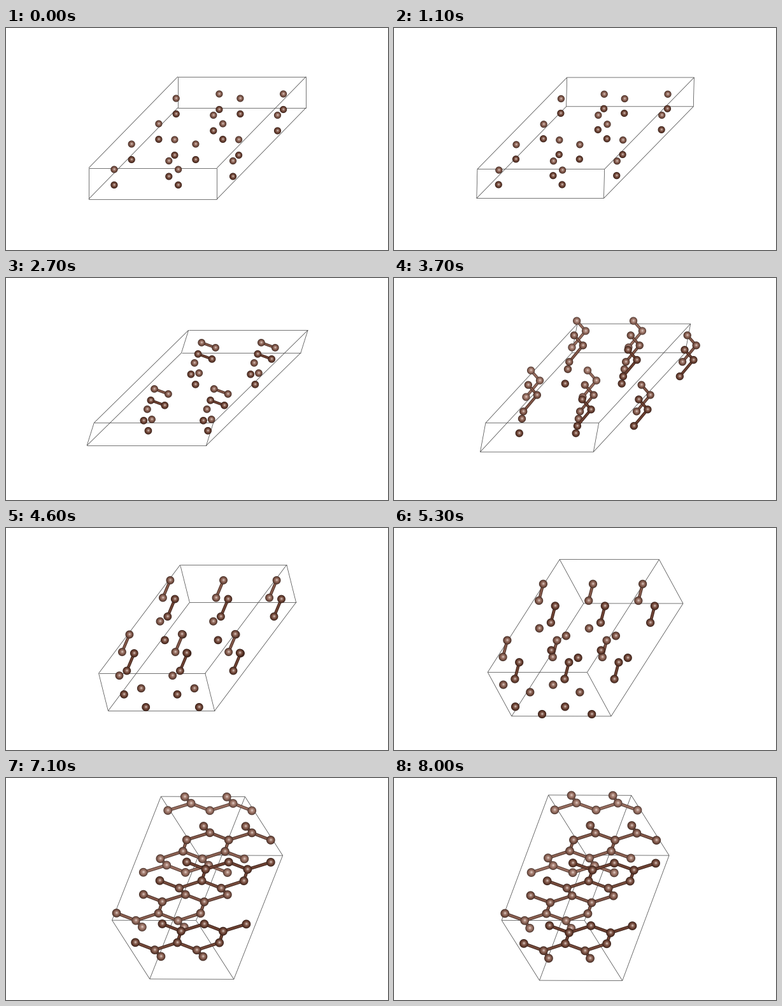
These frames come from a looping animation (600 by 350 pixels, 8.1 s). A matplotlib script:

```python
from itertools import product

import matplotlib.pyplot as plt
import numpy as np
from matplotlib.animation import FuncAnimation
from matplotlib.collections import LineCollection, PolyCollection

WIDTH, HEIGHT, DPI = 600, 350, 100
FRAMES, INTERVAL = 81, 100
CENTRE = np.array([300.6, 173.2])
NAMES = "UVWT"


def ease(frame):
    t = np.asarray(frame) / (FRAMES - 1)
    return t**3 * (6 * t**2 - 15 * t + 10)


# Poses on the path: half-cell vectors a, b, c, then one site of each atom.
KNOTS = ease([0, 27, 46, 80])
POSES = np.array([
    [(100.7, 0), (-70, 72), (0, 24.5), (468.6, 86.5), (426.5, 113), (466.3, 151.5), (542, 126.5)],
    [(93.7, 0), (-74.2, 73), (-5.6, 17.9), (428.4, 92), (395.4, 116), (426, 157), (496.2, 132)],
    [(83.6, 0), (-64, 85.5), (7.4, 29.6), (341.5, 82.4), (330, 110), (352.5, 137.7), (401.8, 117.6)],
    [(65.1, 0.2), (-36.7, 98.7), (29.7, 47.4), (282, 97.7), (276, 115), (307, 126.3), (315, 138.3)],
])
CUBIC = np.linalg.solve(np.vander(KNOTS, 4), POSES.reshape(4, -1))


def pose(frame):
    """Cubic path through the poses, plus a sway that vanishes at each of them."""
    e = ease(frame)
    state = (np.vander([e], 4) @ CUBIC).reshape(7, 2)
    sway = -np.prod(e - KNOTS)
    state[1] += sway * (e - 0.43) * np.array([-300, -440])
    state[2] += sway * np.array([200, -170])
    state[3:] += sway * np.array([1100 * (e - 0.91), 365])
    return state[:3], state[3:]


def block(i, j, k):
    return set(product(i, j, k))


def shift(cells, step):
    return {tuple(np.add(cell, step).tolist()) for cell in cells}


# Bond rules: first atom, second atom, cell step between them.
WU = ("W", "U", (1, 1, 0))
UV = ("U", "V", (0, 0, 0))
CHAIN = [UV, ("V", "W", (0, 0, 0)), ("W", "T", (0, 0, 0)), ("T", "U", (2, 1, -1))]
SHEET = CHAIN + [("V", "W", (-1, 0, 0)), ("T", "U", (1, 1, -1))]


def build_phases():
    """Start frame, visible cells of U, V, W, T, and bond rules."""
    low, mid, near = (-2, -1), (-1, 0), (1, 2)
    two, three, wide = (0, 1), (0, 1, 2), (-1, 0, 1)

    flat_left, flat_mid = block(low, two, near), block(mid, two, near)
    flat_w = block(low, mid, near)
    flat_t = shift(flat_left, (-1, 0, 0))

    inner, pairs = block(mid, two, two), block(wide, two, two)
    folded = inner | block(two, two, near)
    spread = inner | block(two, near, near)
    folded_w, spread_w = (shift(s, (-1, -1, 0)) for s in (folded, spread))

    chain_u = block(two, two, two) | block((2,), near, mid)
    chain_w = pairs - {(1, 1, 0)}

    sheet_u = block(three, (0,), mid) | block(three, (1,), (-1,)) | block(two, two, two)
    sheet_w = block(mid, wide, two) - block(mid, (), two) | {(1, 0, 0)}
    sheet_t = block(mid, wide, two) | block((-2, -1, 0), mid, (2,)) | {(-2, 0, 1)}

    return [
        (0, (flat_left, flat_mid, flat_w, flat_t), []),
        (13, (flat_mid, flat_mid, flat_w, flat_t), []),
        (17, (flat_mid, flat_mid, flat_w, flat_left), []),
        (23, (flat_mid, flat_mid, flat_w, flat_left), [WU]),
        (34, (folded, folded, folded_w, flat_left), [WU, UV]),
        (38, (spread, spread, spread_w, flat_left), [WU, UV]),
        (40, (pairs, pairs, flat_mid, flat_left), [UV]),
        (55, (chain_u, pairs, chain_w, inner), CHAIN),
        (67, (sheet_u, pairs - {(-1, 0, 0)}, sheet_w, sheet_t), SHEET),
    ]


PHASES = build_phases()
LAYER_SHIFT = dict(U=1.0, V=0.8, W=0.3, T=0.0)

ANGLES = np.linspace(0, 2 * np.pi, 28, endpoint=False)
CIRCLE = np.column_stack([np.cos(ANGLES), np.sin(ANGLES)])
NEAR_BROWN = np.array([104, 60, 45]) / 255
FAR_BROWN = np.array([150, 108, 94]) / 255
SHINE = np.array([250, 238, 232]) / 255
LIGHT = np.array([0.06, -0.08])


def mix(start, end, share):
    return start + (end - start) * share


def brown(depth):
    return mix(FAR_BROWN, NEAR_BROWN, np.clip(depth / 2.2, 0, 1))


def ball(centre, radius, depth):
    for size in np.linspace(1, 0.12, 9):
        body = brown(depth) * (1.02 - 0.5 * size**5)
        spot = centre + LIGHT * radius * (1 - size)
        yield spot + CIRCLE * radius * size, mix(body, SHINE, 1.1 * (1 - size) ** 3)


def stick(start, end, radius, depth):
    along = end - start
    normal = np.array([-along[1], along[0]]) / np.hypot(*along)
    for size in np.linspace(0.36, 0.12, 3):
        side = normal * radius * size
        yield (np.array([start + side, end + side, end - side, start - side]),
               brown(depth) * (1.3 - 1.9 * size))


def scene(frame):
    cell, positions = pose(frame)
    sites = dict(zip(NAMES, positions))
    radius = 5.6 + 1.3 * ease(frame)
    rise = np.clip((frame - 37) / 9, 0, 1)
    _, cells, rules = [phase for phase in PHASES if phase[0] <= frame][-1]

    atoms = {}
    for name, places in zip(NAMES, cells):
        for place in sorted(places):
            depth = place[2] + 0.1 * place[1] + rise * LAYER_SHIFT[name]
            atoms[name, place] = (sites[name] + np.array(place) @ cell, depth)

    items = [(depth, ball(spot, radius, depth)) for spot, depth in atoms.values()]
    for first, second, step in rules:
        for (name, place), (spot, depth) in atoms.items():
            other = atoms.get((second, tuple(np.add(place, step).tolist())))
            if name == first and other:
                bond = stick(spot, other[0], radius, (depth + other[1]) / 2)
                items.append((min(depth, other[1]) - 0.01, bond))
    items.sort(key=lambda item: item[0])
    return cell, [part for _, parts in items for part in parts]


def box_edges(cell):
    start = CENTRE - cell.sum(axis=0)
    for axis in range(3):
        first, second = np.delete(cell, axis, axis=0)
        for p, q in product((0, 2), repeat=2):
            corner = start + p * first + q * second
            yield np.array([corner, corner + 2 * cell[axis]])


fig = plt.figure(figsize=(WIDTH / DPI, HEIGHT / DPI), dpi=DPI, facecolor="white")
ax = fig.add_axes([0, 0, 1, 1])
ax.set_xlim(0, WIDTH)
ax.set_ylim(HEIGHT, 0)
ax.axis("off")
box = LineCollection([], colors="#4a4a4a", linewidths=0.55)
solids = PolyCollection([], linewidths=0, zorder=3)
ax.add_collection(box, autolim=False)
ax.add_collection(solids, autolim=False)


def update(frame):
    cell, parts = scene(frame)
    box.set_segments(list(box_edges(cell)))
    solids.set_verts([outline for outline, _ in parts])
    solids.set_facecolor([tuple(np.clip(color, 0, 1)) for _, color in parts])
    return box, solids


animation = FuncAnimation(fig, update, frames=FRAMES, interval=INTERVAL,
                          repeat=True, repeat_delay=0, blit=False)
plt.show()
```
